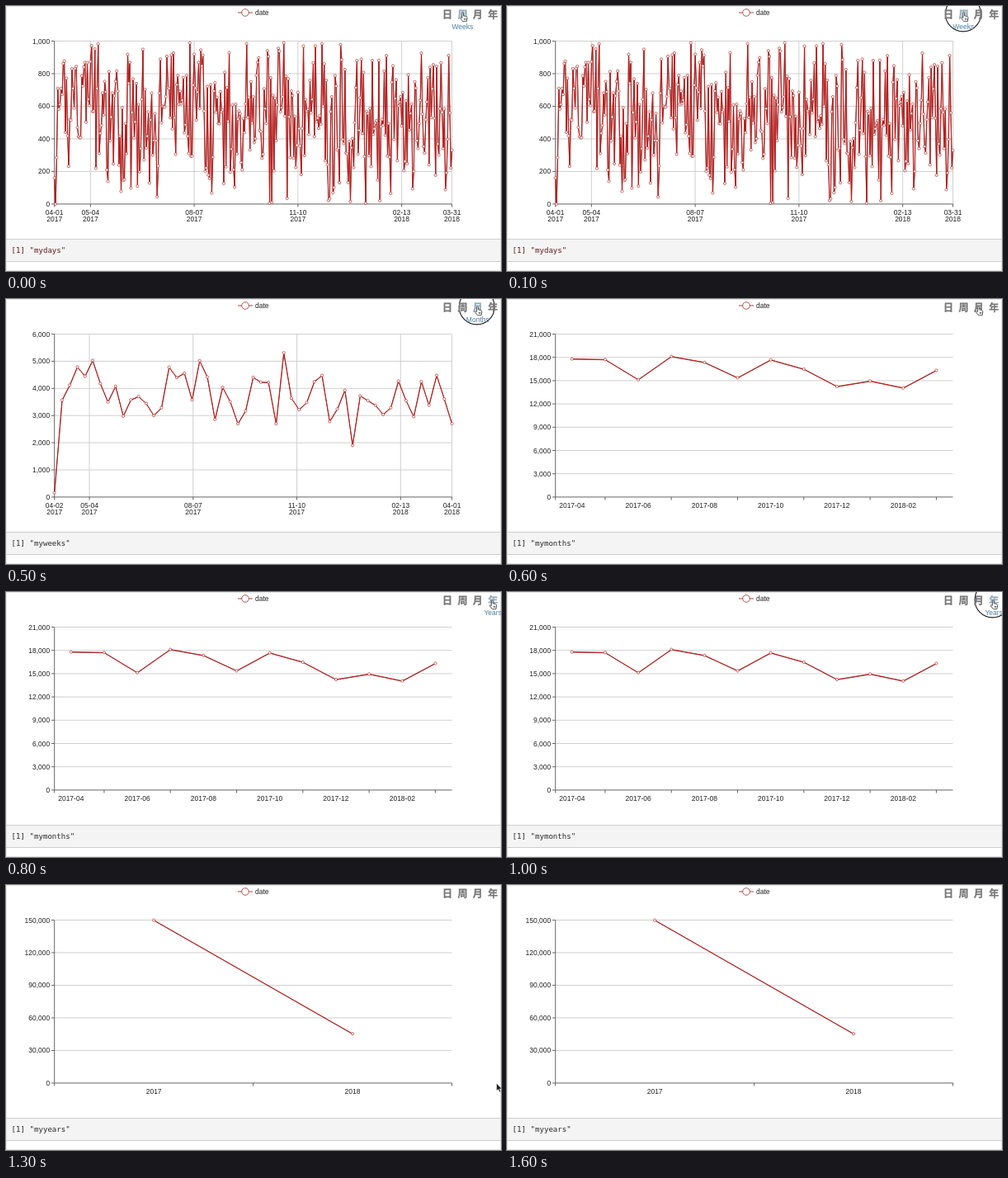
An HTML page for the animation above (1700 ms loop, 600 by 321 pixels).

```html
<!DOCTYPE html>
<html lang="en">
<head>
<meta charset="utf-8">
<title>Date granularity switch</title>
<style>
  html, body { margin: 0; width: 100%; height: 100%; overflow: hidden; background: #fff; }
  svg { display: block; width: 600px; height: 321px; }
  text { font-family: "Liberation Sans", Arial, sans-serif; font-size: 8.5px; fill: #222; }
  .icon { font: bold 12px "Noto Sans CJK SC", "Noto Sans CJK", "Noto Sans CJK JP", sans-serif;
    fill: #777; stroke: #777; stroke-width: 0.25px; }
  .icon.hot { fill: #8fabba; stroke: #8fabba; }
  .tip { fill: #4a7f9e; }
  .code { font: 9.1px "DejaVu Sans Mono", monospace; white-space: pre; }
</style>
</head>
<body>
<svg id="stage" viewBox="0 0 600 321"></svg>
<script>
const LOOP = 1700, TICK = 100;
const LEFT = 58.7, RIGHT = 540.5, TOP = 42.5, BASE = 239.9;
const WIDTH = RIGHT - LEFT;
const GRID = "#cbcbcb", AXIS = "#555";
const stage = document.getElementById("stage");

function add(parent, tag, attrs, content) {
  const el = document.createElementNS("http://www.w3.org/2000/svg", tag);
  for (const key in attrs) el.setAttribute(key, attrs[key]);
  if (content !== undefined) el.textContent = content;
  parent.appendChild(el);
  return el;
}
const line = (g, x1, y1, x2, y2, stroke, w = 0.9) =>
  add(g, "line", { x1, y1, x2, y2, stroke, "stroke-width": w });
const label = (g, x, y, text, anchor = "middle", cls = "") =>
  add(g, "text", { x, y, "text-anchor": anchor, class: cls }, text);
const sum = list => list.reduce((a, b) => a + b, 0);

// Plotted totals, in tens; the first week has a single day
const weeks = [16, 357, 412, 479, 445, 503, 418, 350, 408, 298, 358, 370, 345, 300, 329, 478, 440, 456,
  358, 502, 442, 286, 404, 351, 270, 317, 441, 423, 422, 270, 531, 364, 322, 348, 425, 448, 278, 324,
  393, 190, 373, 355, 338, 304, 329, 427, 355, 296, 425, 338, 448, 361, 270].map(v => v * 10);
const months = [1780, 1772, 1513, 1812, 1735, 1537, 1768, 1648, 1425, 1495, 1406, 1633].map(v => v * 10);
const years = [sum(months.slice(0, 9)), sum(months.slice(9))];

// Seven random days between 0 and 1000, squeezed until they add up to the week
let seed = 41;
const random = () => (seed = (seed * 16807) % 2147483647) / 2147483647;
function splitWeek(total) {
  const days = Array.from({ length: 7 }, () => random() * 1000);
  const s = sum(days);
  return days.map(v => s > total ? v * total / s : 1000 - (1000 - v) * (7000 - total) / (7000 - s));
}
const days = [weeks[0], ...weeks.slice(1).flatMap(splitWeek)];

const isoDate = (month, day) => new Date(Date.UTC(2017, month, day)).toISOString();

// Date marks every 95 days between the two ends of the year
function dateMarks(offset) {
  return [offset, 33, 128, 223, 318, offset + 364].map(day => {
    const iso = isoDate(3, 1 + day);
    return [LEFT + (day - offset) * WIDTH / 364, iso.slice(5, 10), iso.slice(0, 4)];
  });
}

function drawChart({ name, data, max, step, band, marks, ticks, ink = "#2b2b2b" }) {
  const g = add(stage, "g", {});
  const yOf = v => BASE - v / max * (BASE - TOP);
  const slot = WIDTH / (band ? data.length : data.length - 1);
  const xOf = i => LEFT + (i + (band ? 0.5 : 0)) * slot;

  for (let v = 0; v <= max; v += step) {
    const y = yOf(v);
    if (v) line(g, LEFT, y, RIGHT, y, GRID);
    line(g, LEFT - 3.6, y, LEFT, y, AXIS);
    label(g, 53.2, y + 3, v.toLocaleString("en-US"), "end");
  }
  for (const [x, ...rows] of marks) {
    if (!band && x > LEFT) line(g, x, TOP, x, BASE, GRID);
    rows.forEach((row, i) => label(g, x, 252.8 + i * 8.4, row));
  }
  line(g, LEFT, TOP, LEFT, BASE, AXIS);
  line(g, LEFT, BASE, RIGHT, BASE, AXIS);
  for (const x of ticks) line(g, x, BASE, x, BASE + 3.6, AXIS);

  const points = data.map((v, i) => [xOf(i), yOf(v)]);
  const style = { points: points.join(" "), fill: "none", "stroke-linejoin": "bevel" };
  add(g, "polyline", { ...style, stroke: "#6e0c0c", "stroke-width": 0.8, transform: "translate(.2 .4)" });
  add(g, "polyline", { ...style, stroke: "#c01a18", "stroke-width": 1 });
  for (const [cx, cy] of points)
    add(g, "circle", { cx, cy, r: 1.6, fill: "#fff", stroke: "#b3302c", "stroke-width": 0.7 });

  label(g, 6.6, 299, `[1] "${name}"`, "start", "code").style.fill = ink;
  return g;
}

// Fixed page parts
add(stage, "rect", { width: 600, height: 321, fill: "#fff" });
add(stage, "rect", { x: 0.5, y: 0.5, width: 599, height: 320, fill: "none", stroke: "#e4e4e4" });
add(stage, "rect", { x: 0, y: 282.5, width: 600, height: 27, fill: "#f4f4f4", stroke: "#cfcfcf" });
line(stage, 281, 8, 299, 8, "#b0453f", 1);
add(stage, "circle", { cx: 290, cy: 8, r: 4.3, fill: "#fff", stroke: "#b0453f", "stroke-width": 0.9 });
label(stage, 302, 11, "date", "start");

const dayMarks = dateMarks(0), weekMarks = dateMarks(1);
const xs = marks => marks.map(m => m[0]);
const monthSlot = WIDTH / 12;
const monthMarks = Array.from({ length: 6 }, (_, i) =>
  [LEFT + (2 * i + 0.5) * monthSlot, isoDate(3 + 2 * i, 1).slice(0, 7)]);

const charts = [
  drawChart({ name: "mydays", data: days, max: 1000, step: 200,
    marks: dayMarks, ticks: xs(dayMarks), ink: "#5e1a1a" }),
  drawChart({ name: "myweeks", data: weeks, max: 6000, step: 1000,
    marks: weekMarks, ticks: xs(weekMarks) }),
  drawChart({ name: "mymonths", data: months, max: 21000, step: 3000, band: true,
    marks: monthMarks, ticks: [LEFT, ...xs(monthMarks).map(x => x + monthSlot)] }),
  drawChart({ name: "myyears", data: years, max: 150000, step: 30000, band: true,
    marks: [[LEFT + WIDTH / 4, "2017"], [LEFT + WIDTH * 0.75, "2018"]],
    ticks: [LEFT, LEFT + WIDTH / 2, RIGHT] })
];

const ring = add(stage, "circle", { cy: 9.4, r: 21.5, fill: "#fff", stroke: "#1c1c1c", "stroke-width": 1.1 });
const iconX = i => 535 + i * 18.4;
const icons = [..."日周月年"].map((c, i) => label(stage, iconX(i), 15.3, c, "middle", "icon"));
const tips = ["Days", "Weeks", "Months", "Years"].map((t, i) => label(stage, iconX(i), 28, t, "middle", "tip"));

const hand = add(stage, "path", { fill: "#fff", stroke: "#444", "stroke-width": 0.9, "stroke-linejoin": "round",
  d: "M.2 1Q1-.3 1.9 1V4.3L5 5Q6.6 5.4 6.4 7.2L5.7 11.2H1.2L-2.2 6.9Q-1.6 5.5 .2 6.9ZM3 7.3V9.4M4.5 7.4V9.4" });
const arrow = add(stage, "path", { fill: "#222", stroke: "#fff", "stroke-width": 0.6,
  d: "M0 0V9.6L2.2 7.6L3.7 11L5.3 10.3L3.9 7H6.8Z" });

// Each visit: pointer enters an icon, presses it, and the next chart appears one tick later
const visits = [{ icon: 1, enter: 0, press: 100 }, { icon: 2, enter: 400, press: 500 },
  { icon: 3, enter: 800, press: 1000 }];
const EXIT = 1200, GONE = 1500;
const path = [
  ...visits.flatMap(({ icon, enter, press }) =>
    [enter, press + TICK].map(t => [t, iconX(icon) - 0.2 - icon * 0.6, 6.5 + icon])),
  [1300, 594.5, 240], [1400, 596, 312], [LOOP, 596, 312]
];

function pointerAt(t) {
  const i = path.findIndex(p => p[0] > t);
  const [t0, x0, y0] = path[i - 1], [t1, x1, y1] = path[i];
  const k = (t - t0) / (t1 - t0);
  return [x0 + (x1 - x0) * k, y0 + (y1 - y0) * k];
}

const show = (el, on) => { el.style.display = on ? "" : "none"; };

function render(time) {
  const t = Math.floor(time % LOOP / TICK) * TICK;
  const [x, y] = pointerAt(t);
  const visit = visits.find(v => t >= v.enter && t < v.press + TICK);
  const chart = visits.filter(v => t >= v.press + TICK).length;

  charts.forEach((g, i) => show(g, i === chart));
  icons.forEach((el, i) => el.classList.toggle("hot", i === visit?.icon));
  tips.forEach((el, i) => show(el, i === visit?.icon));
  show(ring, visit && t >= visit.press);
  ring.setAttribute("cx", x + 0.3);
  show(hand, t < EXIT);
  show(arrow, t >= EXIT && t < GONE);
  for (const el of [hand, arrow]) el.setAttribute("transform", `translate(${x} ${y})`);
}

const begin = performance.now();
function tick() {
  render(performance.now() - begin);
  requestAnimationFrame(tick);
}
tick();
</script>
</body>
</html>
```
